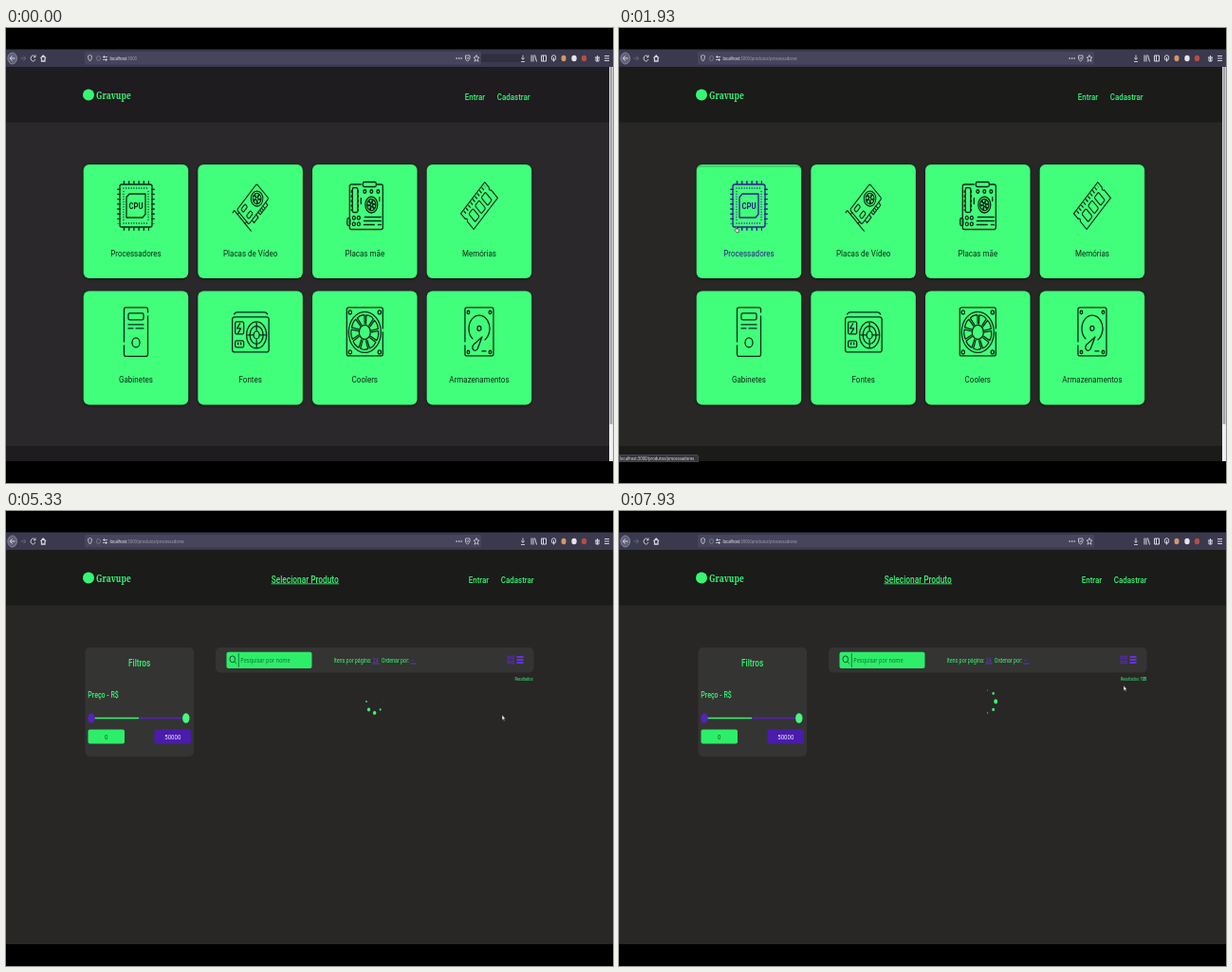
Animation of 640 by 480 pixels, one loop 8 s. Source, as an HTML page:

```html
<!DOCTYPE html>
<html lang="pt-BR">
<head>
<meta charset="utf-8">
<title>Loja de hardware</title>
<style>
  html, body { margin: 0; width: 100%; height: 100%; overflow: hidden; background: #000; }
  svg { display: block; width: 100vw; height: 100vh; }
  text { font-family: Roboto, sans-serif; font-size: 9.7px; white-space: pre; }
  .green { fill: #38f673; }
  .ui { font-family: "Noto Sans", sans-serif; font-size: 5.1px; }
  .brand { font-family: "Noto Serif", serif; font-weight: 700; font-size: 10.2px; }
  #nav text { font-weight: 500; font-size: 9.6px; }
  .label { fill: currentColor; }
  .face { fill: #41ff7b; filter: drop-shadow(0 1.5px 1.5px #141414); }
  .icon { fill: none; stroke: currentColor; stroke-width: 1.3; stroke-linecap: round; stroke-linejoin: round; }
  .icon text { fill: currentColor; stroke: none; font-weight: 700; font-size: 9.3px; }
  .chrome { fill: none; stroke: #d5d5df; stroke-width: 1; }
</style>
</head>
<body>
<svg viewBox="0 0 640 480">
  <rect width="640" height="480"/>
  <rect id="body" y="41" width="640" height="416"/>
  <rect id="header" y="41" width="640" height="58.5"/>

  <g id="browser">
    <rect y="22.5" width="640" height="18.5" fill="#3a394d"/>
    <rect x="83" y="25" width="418" height="13.5" rx="1.5" fill="#46455c"/>
    <rect id="search" x="501" y="27.5" width="46" height="8.5" fill="#302f40"/>
    <g class="chrome">
      <ellipse cx="6.7" cy="32" rx="4.8" ry="6" fill="#62617a" stroke="#85849c"/>
      <path d="M9.5 32H4.5M6.5 29.5L4.3 32 6.5 34.5"/>
      <path d="M15.5 32H20.5M18.5 29.5L20.7 32 18.5 34.5" stroke="#686779"/>
      <path d="M30.3 30A2.4 3 0 1 0 30.8 33M31 28.5V30.8H29"/>
      <path d="M36.5 32L39.2 29 42 32M37.5 32V35H41V32" stroke-width="1.3"/>
      <path d="M86.5 29.5L88.5 28.5 90.5 29.5Q90.5 33.5 88.5 35 86.5 33.5 86.5 29.5Z" stroke-width=".8"/>
      <ellipse cx="97.5" cy="32" rx="2" ry="2.6" stroke="#85849a" stroke-width=".7"/>
      <path d="M102 30.5H107M102 33.5H107M103.5 29V32M105.5 32V35" stroke-width=".8"/>
      <path d="M474.5 32H481" stroke-width="1.4" stroke-dasharray="1.3 1.2"/>
      <path d="M484.5 29H489V32Q488.5 34 486.7 35 484.5 34 484.5 32ZM485.7 31L486.7 32.5 488 31" stroke-width=".8"/>
      <path d="M496 28.5L497 31H499L497.3 32.7 498 35.3 496 33.8 494 35.3 494.7 32.7 493 31H495Z" stroke-width=".8"/>
      <path d="M545 28.5V33M543.5 31.5L545 33.5 546.5 31.5M543 35.5H547" stroke-width=".9"/>
      <path d="M554 28.5V35.5M556 28.5V35.5M557.5 28.5L559.5 35.5"/>
      <path d="M564.5 29H569.5V35H564.5ZM566.5 29V35"/>
      <ellipse cx="577.5" cy="31.5" rx="2.2" ry="2.8"/>
      <path d="M577.5 31V35.5M621 31H626M623.5 29V35M622 31V35H625V31M631 29.5H636M631 32H636M631 34.5H636"/>
    </g>
    <ellipse cx="588" cy="32" rx="2.5" ry="3.2" fill="#d39867"/>
    <ellipse cx="599" cy="32" rx="2.7" ry="3.3" fill="#e5e5e8"/>
    <ellipse cx="609.5" cy="32" rx="2.7" ry="3.3" fill="#b84c45"/>
    <text class="ui" transform="translate(109.5 33.8) scale(.827 1)" fill="#f4f4fa">localhost<tspan id="url" fill="#a09fb2">:3000</tspan></text>
  </g>

  <ellipse cx="87" cy="70.5" rx="6" ry="6" class="green"/>
  <text class="brand green" transform="translate(95 74.5) scale(.827 1)">Gravupe</text>
  <g id="nav"></g>

  <g id="home">
    <rect id="footer" y="441" width="637" height="16"/>
    <rect x="636" y="41" width="4" height="416" fill="#eeeef0"/>
    <rect x="636.6" y="41" width="2.8" height="377" fill="#a4a4a8"/>
    <g id="cards"></g>
    <g id="status">
      <path d="M0 450.5H82Q83.5 450.5 83.5 452V457.5H0Z" fill="#34343c" stroke="#66666c" stroke-width=".5"/>
      <text class="ui" transform="translate(1 455.8) scale(.827 1)" fill="#e0e0e4">localhost:3000/produtos/processadores</text>
    </g>
  </g>

  <g id="catalog">
    <rect x="83.5" y="144" width="114.5" height="115" rx="5" fill="#343433"/>
    <rect x="221" y="144" width="335.5" height="26.5" rx="5" fill="#343433"/>
    <path d="M279.5 76.8H351" stroke="#38f673" stroke-width=".8"/>
    <path d="M90 218.5H140" stroke="#38f673" stroke-width="1.4"/>
    <path d="M140 218.5H190" stroke="#5523b5" stroke-width="1.4"/>
    <ellipse cx="90" cy="218.5" rx="3.7" ry="5.3" fill="#5523b5"/>
    <ellipse cx="189.8" cy="218.5" rx="3.7" ry="5.3" fill="#48f87e"/>
    <rect x="86.5" y="230.5" width="38.5" height="15" rx="2" fill="#2dee69"/>
    <rect x="156.5" y="230.5" width="38.5" height="15" rx="2" fill="#4a1cac"/>
    <rect x="232.5" y="148.8" width="90" height="17.2" rx="2" fill="#2dee69"/>
    <path d="M241 158.8L243 161.5M245.3 150V165" stroke="#177c3b" fill="none"/>
    <ellipse cx="238.8" cy="156.3" rx="2.8" ry="3.4" fill="none" stroke="#14552b"/>
    <path d="M386.5 161H393.5M426.5 161H432.5" stroke="#6a38d8" stroke-width=".8"/>
    <path d="M529 153H531.3V156H529ZM533 153H535.3V156H533ZM529 158H531.3V161H529ZM533 158H535.3V161H533Z" fill="none" stroke="#5a2cc0" stroke-width=".9"/>
    <path d="M538.5 154H545.5M538.5 157H545.5M538.5 160H545.5" stroke="#6631e0" stroke-width="2.2"/>
    <g id="catalogText"></g>
    <g id="loader" class="green"></g>
  </g>

  <g id="cursor" fill="#fff" stroke="#222" stroke-width=".5">
    <path id="arrow" d="M0 0V5.5L1.2 4.5 2 6.5 2.8 6 2.1 4.2H3.500Z"/>
    <path id="hand" d="M1 .5Q1.7 0 2 .8V2.800L4.500 3.300 4.300 6.500H1.500L-.2 4.200Q0 3.400 1 4Z" fill="#ddd"/>
  </g>
</svg>
<script>
const $ = id => document.getElementById(id);
const SQUEEZE = .827;
const label = (x, y, text, attrs = 'class="green"', anchor = 'start') =>
  `<text transform="translate(${x} ${y}) scale(${SQUEEZE} 1)" text-anchor="${anchor}" ${attrs}>${text}</text>`;
const path = (d, attrs = '') => `<path d="${d}" ${attrs}/>`;
const box = (x, y, w, h, r = 1.5, attrs = '') => `<rect x="${x}" y="${y}" width="${w}" height="${h}" rx="${r}" ${attrs}/>`;
const oval = (x, y, rx, ry = rx * 1.25) => `<ellipse cx="${x}" cy="${y}" rx="${rx}" ry="${ry}"/>`;
const corners = (w, h, r, x = 0, y = 0) => [-w, w].flatMap(a => [-h, h].map(b => oval(x + a, y + b, r))).join('');
const tilted = (x, y, content) => `<g transform="translate(${x} ${y}) scale(.79 1) rotate(-46)">${content}</g>`;

// Each blade is a rounded wedge between the radii `from` and `to`.
function blades(x, y, rx, ry, count, from, to) {
  const step = 2 * Math.PI / count;
  const at = (k, turn) => `${x + rx * k * Math.cos(turn)} ${y + ry * k * Math.sin(turn)}`;
  return Array.from({ length: count }, (_, i) => {
    const a = i * step, b = a + step * .72;
    return path(`M${at(from, a)}L${at(to, a - step * .1)}Q${at(to * 1.08, (a + b) / 2)} ${at(to, b)}L${at(from, b)}`);
  }).join('');
}
const fan = (x, y, rx, ry, count) => oval(x, y, rx, ry) + blades(x, y, rx, ry, count, .2, .72);

const icons = {
  'Processadores':
    box(-17, -22.5, 34, 45, 2) +
    path('M-13.2-24.5H14M-13.2 24.500H14M-18-18V19M18-18V19', 'stroke-width="3.500" stroke-dasharray="1.400 3.800" stroke-linecap="butt"') +
    path('M-13-18.500H13M-13 18.500H13M-13-15V16M13-15V16', 'stroke-dasharray=".1 2.600"') +
    path('M-7-12.5H10V9L7 12.5H-10V-9Z') +
    label(0, 3.4, 'CPU', '', 'middle'),
  'Placas de Vídeo':
    tilted(2, -1, box(-18, -11, 38, 22, 2) + path('M-24-13H-21V18') +
      path('M-12 11V15H-4V11M0 11V15H14V11M3 12V15M6 12V15M9 12V15M-21-7H-18M-21 7H-18') +
      box(-14, -7.5, 8, 4.500) + box(-14, 2.500, 8, 4.500) + oval(9, 0, 8, 8) + blades(9, 0, 8, 8, 5, .2, .72)),
  'Placas mãe':
    path('M-4-22.500H-14Q-16-22.500-16-20.500V23Q-16 25-14 25H17Q19 25 19 23V-20.500Q19-22.500 17-22.500H13') +
    box(-2, -25, 14, 5) + box(-13, -19, 5.500, 26) + path('M-14-16V5M-7-16V5', 'stroke-dasharray="2 3"') +
    box(-18.5, 13, 3, 8) + oval(0, -15, 1.4) + oval(7, -15, 1.4) + oval(14, -15, 1.4) +
    fan(7, -1, 6.5, 8.5, 6) + corners(2.5, 3.2, 1.5, -9, 16) +
    path('M0 12H17M-1 16H17M-1 20H10M14 20H17M-4-8V-2M15.5-9V-5'),
  'Memórias':
    tilted(0, 0, path('M-23-12H23V-4Q20-2 23 0V12H-23V0Q-20-2-23-4Z') +
      path('M-19-9H20', 'stroke-width="4" stroke-dasharray="1.500 2.800" stroke-linecap="butt"') +
      [-16, -4, 8].map(x => box(x, -4, 8, 12)).join('')),
  'Gabinetes':
    path('M-12.5 10V-24Q-12.5-26-10.5-26H10.5Q12.5-26 12.5-24V-21M12.5-17V23Q12.5 25.500 10.5 25.500H-10.5Q-12.5 25.500-12.5 23V14') +
    box(-8, -20, 16, 7) + path('M-8-8H8M-8-4H-3M0-4H8') + oval(0, 11, 4, 5),
  'Fontes':
    path('M-17-19Q-16-21-14-21H15Q17-21 18-19') + box(-19, -16, 38.5, 37, 2.500) +
    oval(6.5, 3, 10.5, 14) + oval(6.5, 3, 7, 9.5) + oval(6.5, 3, 3, 4) +
    path('M6.500-10V-2M6.500 8V16M-3 3H3M10 3H16') +
    box(-16, -11, 9, 13) + path('M-11-9L-14-4H-10L-13 1') +
    box(-16, 9, 9, 7) + path('M-13 11V13M-10 11V13'),
  'Coolers':
    path('M-17-26H17Q19-26 19-24V-4M19 0V23Q19 25 17 25H-17Q-19 25-19 23V-24Q-19-26-17-26') +
    corners(15.5, 21, 1.6) + oval(0, 0, 17, 21.5) + oval(0, 0, 6, 7.6) + blades(0, 0, 17, 21.5, 9, .42, .84),
  'Armazenamentos':
    path('M-15 10V-24Q-15-26-13-26H13Q15-26 15-24V23Q15 25 13 25H-13Q-15 25-15 23V14') +
    corners(11.5, 21, 1.3) + path('M-7 7A11 14 0 1 1 6 8') +
    oval(0, -4, 2) + path('M3 5L-2 18Q-5 21-7 17.500-7.500 15-6 13Z') + path('M3 20H7')
};

$('cards').innerHTML = Object.entries(icons).map(([name, icon], i) => {
  const x = 81.7 + i % 4 * 120.65, y = 144 + (i >> 2) * 133.4;
  return `<g class="card" transform="translate(${x} ${y})">
    ${box(0, 0, 110.5, 120, 6, 'class="face"')}
    <path class="edge" d="M.5 4Q1 .5 5 .5H105.5Q109.5 .5 110 4L106 2.8H4Z" fill="#22a64c"/>
    <g class="icon" transform="translate(55.3 43.5)">${icon}</g>
    ${label(55.3, 96.5, name, 'class="label"', 'middle')}</g>`;
}).join('');

$('nav').innerHTML = label(483.8, 75.8, 'Entrar') + label(517.8, 75.8, 'Cadastrar');

const size = (px, color = '#38f673', more = '') => `fill="${color}" style="font-size:${px}px;${more}"`;
$('catalogText').innerHTML =
  label(315.2, 75.8, 'Selecionar Produto', size(10.1, '#38f673', 'font-weight:500'), 'middle') +
  label(140.6, 164.2, 'Filtros', size(10, '#38f673', 'font-weight:500'), 'middle') +
  label(86.3, 197, 'Preço - R$', size(8.5, '#38f673', 'font-weight:500')) +
  label(105.6, 241, '0', size(7.3, '#14552b'), 'middle') +
  label(175.8, 241, '50000', size(7.3, '#f0eaff'), 'middle') +
  label(247.3, 159.7, 'Pesquisar por nome', size(6.7, '#167337', "font-family:'Noto Sans',sans-serif")) +
  label(345.5, 159.6, 'Itens por página:', size(6.5)) +
  label(386.8, 159.6, '24', size(6.5, '#6a38d8')) +
  label(395.7, 159.6, 'Ordenar por:', size(6.5)) +
  label(427, 159.6, '--', size(6.5, '#6a38d8')) +
  label(556.3, 178.8, 'Resultados:<tspan id="count" font-weight="700"> 135</tspan>', size(4.6), 'end');

const dots = Array.from({ length: 8 }, (_, i) => {
  const dot = document.createElementNS('http://www.w3.org/2000/svg', 'ellipse');
  const a = i * Math.PI / 4;
  dot.setAttribute('cx', 388.6 + 8.6 * Math.cos(a));
  dot.setAttribute('cy', 201 + 12 * Math.sin(a));
  return $('loader').appendChild(dot);
});
const cards = [...document.querySelectorAll('.card')];
const edges = [...document.querySelectorAll('.edge')];

const LOOP = 8000, FRAME = 1000 / 15, SWITCH = 2000;
const bursts = [[0, 60], [200, 1060], [1200, 2060], [2200, 2730], [3530, 4060], [4200, 5060],
  [5200, 5730], [5930, 6000], [6260, 6730], [6930, 7060], [7400, 7400], [7660, 7930]];
const pointer = [[200, 430, 300], [600, 385, 200], [800, 440, 215], [1000, 594, 250],
  [1270, 590, 246], [1500, 480, 220], [1700, 280, 215], [1930, 122, 209], [2730, 150, 225],
  [3530, 250, 250], [4000, 343.5, 261], [4300, 372, 272], [5060, 515, 222], [5330, 523, 215],
  [6260, 528, 203], [7930, 532, 184]];
const spin = [[2000, -610], [4000, 88], [5330, 468], [6260, 880], [7930, 1445]];
const hovers = [[2, 520, 1020], [3, 1430, 1520], [2, 1520, 1610], [1, 1610, 1720], [0, 1740, 9000]];

const clamp = v => Math.min(1, Math.max(0, v));
function track(keys, t, k) {
  const i = keys.findIndex(key => key[0] > t);
  if (i === 0) return keys[0][k];
  if (i < 0) return keys[keys.length - 1][k];
  const [a, b] = [keys[i - 1], keys[i]];
  return a[k] + (b[k] - a[k]) * (t - a[0]) / (b[0] - a[0]);
}
function heldTime(t) {
  const [start, end] = bursts.filter(b => b[0] <= t + 5).pop();
  return Math.max(start, Math.min(Math.floor((t + 5) / FRAME) * FRAME, end));
}
const show = (id, on) => $(id).style.display = on ? '' : 'none';

function draw(time) {
  const t = heldTime(time % LOOP), home = t < SWITCH - 5, early = t < 1200;
  show('home', home);
  show('catalog', !home);
  show('search', early);
  $('nav').setAttribute('transform', `translate(${home ? 0 : 4} 0)`);
  $('body').setAttribute('fill', early ? '#2a282b' : '#282726');
  for (const id of ['header', 'footer']) $(id).setAttribute('fill', early ? '#1e1c1f' : '#1b1b1a');
  $('url').textContent = t < 1860 ? ':3000' : ':3000/produtos/processadores';
  show('status', t >= 1740);
  show('count', t >= 7660);

  cards.forEach((card, i) => {
    const p = Math.max(...hovers.map(([index, from, to]) =>
      index === i ? Math.min(clamp((t - from) / 160), clamp(1 - (t - to) / 160)) : 0));
    const mix = (a, b) => Math.round(a + (b - a) * p);
    card.style.color = `rgb(${mix(14, 52)},${mix(42, 24)},${mix(24, 145)})`;
    edges[i].style.opacity = p * .45;
  });

  show('cursor', t >= 200);
  $('cursor').setAttribute('transform', `translate(${track(pointer, t, 1)} ${track(pointer, t, 2)})`);
  show('hand', home);
  show('arrow', !home);

  const peak = track(spin, t, 1);
  dots.forEach((dot, i) => {
    const off = Math.abs((((i * 45 - peak + 180) % 360) + 360) % 360 - 180);
    const r = 2.1 * Math.max(0, 1 - off / 120);
    dot.setAttribute('rx', r);
    dot.setAttribute('ry', r * 1.2);
  });
}

const began = performance.now();
(function tick() {
  draw(performance.now() - began);
  requestAnimationFrame(tick);
})();
</script>
</body>
</html>
```
